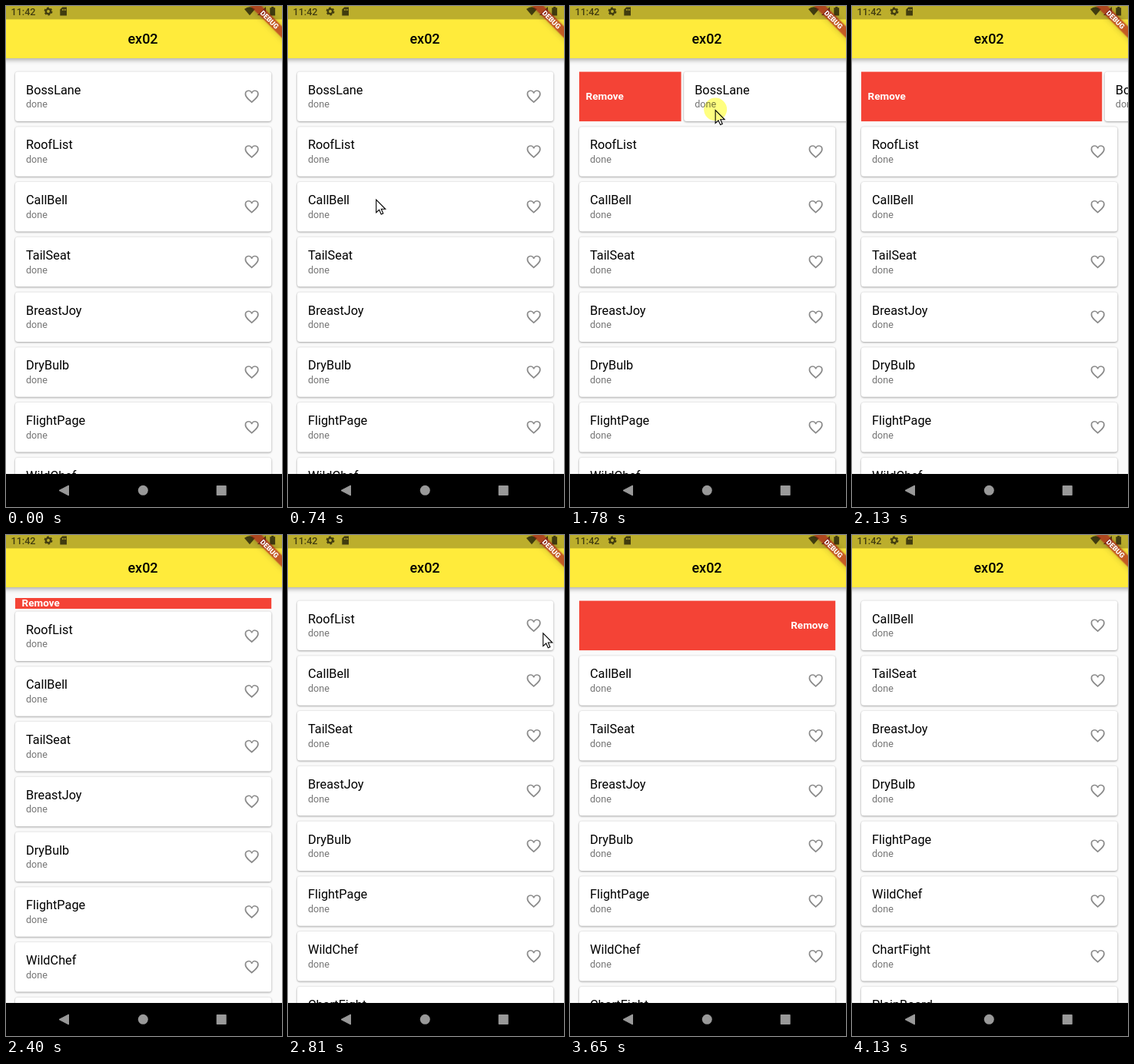
Animation of 359 by 652 pixels, one loop 5.32 s. Source, as an HTML page:

```html
<!DOCTYPE html>
<html lang="en">
<head>
<meta charset="utf-8">
<title>Swipe to remove</title>
<style>
  html, body { margin: 0; width: 100%; height: 100%; overflow: hidden; background: #fafafa; }
  svg { font-family: Roboto, sans-serif; }
  #stage { display: block; }
  .row { overflow: visible; }
  .card { fill: #fff; filter: drop-shadow(0 0 .8px rgba(0,0,0,.12)) drop-shadow(0 1px 1.2px rgba(0,0,0,.3)); }
  .name { font-size: 16.3px; }
  .note { font-size: 12.6px; fill: #757575; }
  .remove { font-size: 13.5px; font-weight: 700; fill: #fff; }
  .bar { fill: #ffeb3b; filter: drop-shadow(0 2px 3px rgba(0,0,0,.35)); }
  .ribbon { filter: drop-shadow(0 0 4px rgba(0,0,0,.35)); }
  #press { fill: #ffff80; mix-blend-mode: multiply; }
</style>
</head>
<body>
<svg id="stage" width="359" height="652" viewBox="0 0 359 652">
  <defs>
    <path id="heart" fill="#8a8a8a" fill-rule="evenodd" d="M12 21.35C4.5 14.6 2 12.2 2 8.5A5.5 5.5 0 0 1 12 5.09 5.5 5.5 0 0 1 22 8.5C22 12.2 19.5 14.6 12 21.35ZM12 18.65C17 14.2 20 11.4 20 8.5A3.5 3.5 0 0 0 12.93 7.36H11.07A3.5 3.5 0 0 0 4 8.5C4 11.4 7 14.2 12 18.65Z"/>
  </defs>
  <rect width="359" height="652" fill="#fafafa"/>
  <g id="list"></g>

  <!-- app bar and status bar -->
  <rect class="bar" x="-10" y="-10" width="379" height="78"/>
  <rect width="359" height="17.4" fill="#bcae2c"/>
  <text x="178" y="49.3" text-anchor="middle" font-size="18" font-weight="500">ex02</text>
  <g fill="#000" opacity=".65">
    <text x="6.5" y="12" font-size="12.6" font-weight="500">11:42</text>
    <g fill="none" stroke="#000">
      <circle cx="55" cy="7" r="3.1" stroke-width="2.4"/>
      <circle cx="55" cy="7" r="4.7" stroke-width="1.6" stroke-dasharray="2.7 2.22"/>
    </g>
    <path d="M73.4 1.5H79V12.5H70.3V4.6ZM73 4v2h1V4ZM75 4v2h1V4ZM77 4v2h1V4Z" fill-rule="evenodd"/>
    <path d="M310 4Q317-1.5 324 4L317 12.3Z"/>
    <path d="M338 1V12H327Z"/>
    <path d="M343.3 2.2H345.2V1H348.2V2.2H350.1V12.4H343.3Z"/>
  </g>
  <g transform="translate(342.8 17.8) rotate(45)">
    <rect class="ribbon" x="-36" y="-5.4" width="72" height="10.8" fill="#b71c1c" fill-opacity=".63"/>
    <text y="3.3" text-anchor="middle" font-size="9.2" font-weight="900" fill="#fff">DEBUG</text>
  </g>

  <!-- navigation bar -->
  <rect y="609" width="359" height="43"/>
  <g fill="#999">
    <path d="M69 630.5 81.5 624V637Z" stroke="#999" stroke-linejoin="round"/>
    <circle cx="178.3" cy="630.3" r="6.5"/>
    <rect x="273.7" y="624" width="13" height="13" rx=".8"/>
  </g>

  <g id="pointer">
    <path d="M0 .8V17.6L3.9 14 6.5 19.8 9.1 18.7 6.6 13H12Z" fill="#fff" stroke="#000" stroke-width="1.1"/>
    <circle id="press" r="15" cy="-.3"/>
  </g>
</svg>
<script>
const LOOP = 5320, FIRST_STEP = 390, STEP = 69.1, LAG = 70;
const ROW_W = 340.4, ROW_H = 71.75, LIST_X = 8.4, LIST_Y = 82;
const names = ['BossLane', 'RoofList', 'CallBell', 'TailSeat', 'BreastJoy',
  'DryBulb', 'FlightPage', 'WildChef', 'ChartFight', 'PlainBoard'];

// One swipe per removed row; path holds pointer positions as [time, x, y].
const swipes = [
  { side: 1, press: 1150, release: 1990, grip: 115, collapse: 2335, collapseTime: 140,
    path: [[390, 330, 625], [880, 61, 158], [1290, 125, 133], [1355, 125, 133],
      [1580, 320, 134], [1850, 158, 135], [2130, 500, 137]] },
  { side: -1, press: 2940, release: 3440, grip: 318, collapse: 3720, collapseTime: 400,
    path: [[2800, 332, 127], [3440, -60, 135]] }
];

const $ = id => document.getElementById(id);
const clamp01 = u => Math.min(1, Math.max(0, u));
const ease = u => (1 - Math.cos(Math.PI * clamp01(u))) / 2;

function pointerAt(path, t) {
  const next = path.findIndex(key => key[0] > t);
  if (next <= 0) return path.at(next).slice(1);
  const [t0, ...from] = path[next - 1], [t1, ...to] = path[next];
  return from.map((v, i) => v + (to[i] - v) * ease((t - t0) / (t1 - t0)));
}

// The card trails the pointer from the point where it was grabbed.
function cardOffset({ path, press, grip, side }, t) {
  if (t < press) return 0;
  return side * Math.max(0, side * (pointerAt(path, t - LAG)[0] - grip));
}

const rowSize = ({ collapse, collapseTime }, t) =>
  (1 - clamp01((t - collapse) / collapseTime)) ** 3;

const backing = ({ side }) => `
  <svg class="back" width="0" height="${ROW_H}">
    <rect x="3.6" y="3.6" width="333.2" height="64.5" fill="#f44336"/>
    <text class="remove" y="40.3" x="${side > 0 ? 12.2 : 328}"
      text-anchor="${side > 0 ? 'start' : 'end'}">Remove</text>
  </svg>`;

$('list').innerHTML = names.map((name, i) => `
  <svg class="row" x="${LIST_X}" width="${ROW_W}" height="${ROW_H}"><g class="body">
    ${swipes[i] ? backing(swipes[i]) : ''}
    <g class="front">
      <rect class="card" x="3.6" y="3.6" width="333.2" height="64.5" rx="3.6"/>
      <text class="name" x="17.6" y="32.6">${name}</text>
      <text class="note" x="17.6" y="50.3">done</text>
      <use href="#heart" transform="translate(300.4 25) scale(.905)"/>
    </g>
  </g></svg>`).join('');
const rows = [...document.querySelectorAll('.row')];

function set(element, attributes) {
  for (const name in attributes) element.setAttribute(name, attributes[name]);
}

// Poses one row and returns its height.
function placeRow(row, y, swipe, t) {
  set(row, { y });
  if (!swipe) return ROW_H;
  const dx = cardOffset(swipe, t), size = rowSize(swipe, t), height = ROW_H * size;
  const width = Math.min(Math.abs(dx), ROW_W), x = dx < 0 ? ROW_W - width : 0;
  set(row, { height });
  set(row.querySelector('.back'), { x, width, viewBox: `${x} 0 ${width} ${ROW_H}` });
  set(row.querySelector('.front'), { transform: `translate(${dx} 0)` });
  set(row.querySelector('.body'), { transform: `translate(0 ${(height - ROW_H) / 2})` });
  row.style.overflow = size < 1 ? 'hidden' : 'visible';
  return height;
}

function draw(now) {
  const t = FIRST_STEP + Math.floor((now % LOOP - FIRST_STEP) / STEP) * STEP;
  let y = LIST_Y;
  rows.forEach((row, i) => { y += placeRow(row, y, swipes[i], t); });

  const active = swipes.find(({ path }) => t >= path[0][0] && t < path.at(-1)[0]);
  $('pointer').style.display = active ? '' : 'none';
  if (active) {
    set($('pointer'), { transform: `translate(${pointerAt(active.path, t)})` });
    $('press').style.display = t >= active.press && t < active.release ? '' : 'none';
  }
  requestAnimationFrame(draw);
}
draw(0);
</script>
</body>
</html>
```
